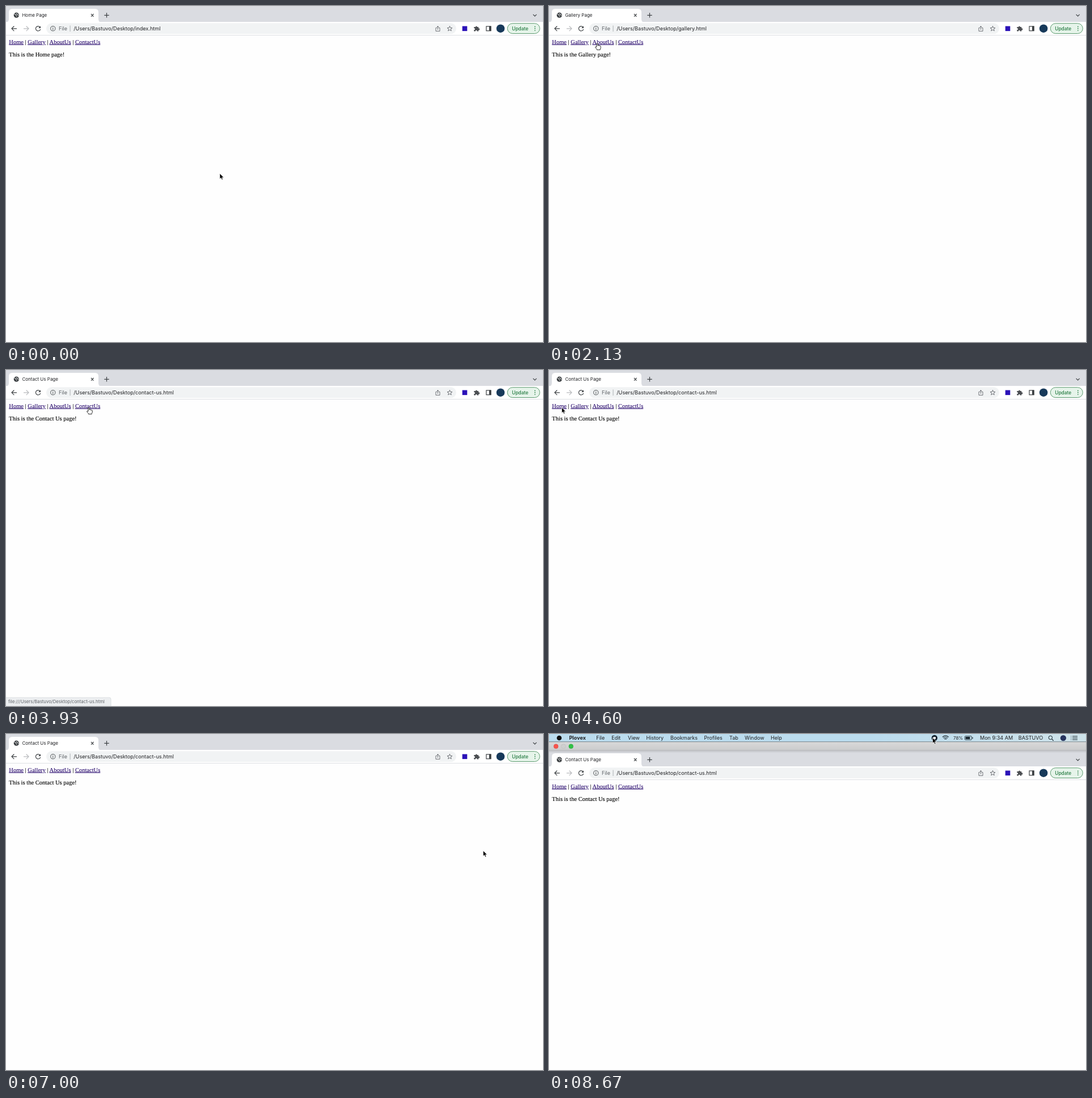
Recreate the animation shown at these times as an HTML page. Size 947x592 px, loop 8740 ms.

```html
<!DOCTYPE html>
<html lang="en">
<head>
<meta charset="utf-8">
<title>Page navigation</title>
<style>
html, body { margin: 0; width: 100%; height: 100%; overflow: hidden; background: #fefefe; }
svg { display: block; width: 100vw; height: 100vh; }
text { font-family: Inter, Roboto, sans-serif; font-size: 9.05px; fill: #202124; white-space: pre; }
.small { font-size: 8px; }
.page { font-family: "Liberation Serif", "Times New Roman", serif; font-size: 10.5px; fill: #000; stroke: #000; stroke-width: .12; }
.link { fill: #2c0f70; stroke: #2c0f70; text-decoration: underline; }
.line { fill: none; stroke: #3c4043; stroke-width: 1.2; }
</style>
</head>
<body>
<svg viewBox="0 0 947 592">
  <defs>
    <linearGradient id="bar" x2="0" y2="1">
      <stop offset="0" stop-color="#dadada"/><stop offset="1" stop-color="#c9cacb"/>
    </linearGradient>
    <linearGradient id="shade" x2="0" y2="1">
      <stop offset="0" stop-color="#000" stop-opacity=".14"/><stop offset="1" stop-color="#000" stop-opacity="0"/>
    </linearGradient>
    <linearGradient id="sky">
      <stop offset=".6" stop-color="#bbdcee"/><stop offset="1" stop-color="#cfe3ea"/>
    </linearGradient>
  </defs>
  <rect width="947" height="592" fill="#fefefe"/>

  <g id="window">
    <rect y="-16" width="947" height="17" fill="url(#bar)"/>
    <g stroke-width=".5">
      <circle cx="12.3" cy="-7.3" r="3.9" fill="#f7544d" stroke="#d8433d"/>
      <circle cx="25.6" cy="-7.3" r="3.9" fill="#cfcfcf" stroke="#b9b9b9"/>
      <circle cx="38.8" cy="-7.3" r="3.9" fill="#32c146" stroke="#27a238"/>
    </g>

    <!-- tab strip -->
    <rect width="947" height="28.5" fill="#dadce1"/>
    <rect id="shadow" y="-.5" width="947" height="5" fill="url(#shade)"/>
    <path d="M0 28.5Q5 28.5 5 23V11Q5 5 11 5H157Q163 5 163 11V23Q163 28.5 168 28.5Z" fill="#fff"/>
    <rect y="28" width="947" height="23.5" fill="#fff"/>
    <path d="M0 51.5H947" stroke="#dadce0" stroke-width=".9"/>
    <circle cx="18.3" cy="16.2" r="4.6" fill="#3c4043"/>
    <path d="M15 14.4Q17 14.2 17.6 16T19.2 18.8M18.8 12.8Q18.2 14.6 20 15.1T22 17" fill="none" stroke="#fff"/>
    <text id="title" class="small" x="28.4" y="19.1"></text>
    <path class="line" d="M150 14l4.6 4.6M154.6 14l-4.6 4.6M173.3 16.3h8.4M177.5 12.1v8.4M929.6 14.8l3 3 3-3"/>

    <!-- toolbar -->
    <rect x="71" y="30.2" width="723" height="19" rx="9.5" fill="#f1f3f4"/>
    <path class="line" d="M19 39.8H10.4M14.3 35.5L10 39.8L14.3 44.1"/>
    <path class="line" d="M31 39.8H39.6M35.7 35.5L40 39.8L35.7 44.1" style="stroke:#b9bbbe"/>
    <path class="line" d="M59.8 37A4.2 4.2 0 1 0 60.7 40.8"/>
    <path d="M61 35.2V39H57.2Z" fill="#3c4043"/>
    <circle cx="82.8" cy="39.7" r="4.1" class="line" style="stroke-width:.9"/>
    <path d="M82.8 39.1V42M82.8 37.3V38.3" class="line" style="stroke-width:1"/>
    <text x="93" y="43" style="fill:#5f6368">File</text>
    <path d="M113.1 34.5V45" stroke="#9aa0a6" stroke-width=".8"/>
    <text id="url" x="119.3" y="43" style="font-size:9.15px"></text>
    <g class="line" style="stroke-width:.9;stroke:#5f6368">
      <path d="M759.8 38.5H758V44.3H765V38.5H763.2M761.5 41.8V35.6M759.6 37.4L761.5 35.5L763.4 37.4"/>
      <path id="star"/>
    </g>
    <rect x="804.7" y="35.5" width="8.6" height="8.6" fill="#2b12b8"/>
    <path d="M825.3 37H828A1.5 1.5 0 1 1 831 37H833.3V39.5A1.5 1.5 0 1 1 833.3 42.3V44.6H830.7A1.4 1.4 0 1 0 828 44.6H825.3V42A1.4 1.4 0 1 0 825.3 39.3Z" fill="#4b4e52"/>
    <rect x="847" y="35.9" width="8" height="7.8" class="line"/>
    <path d="M852 35.5H855.5V44H852Z" fill="#3c4043"/>
    <circle cx="872.1" cy="39.7" r="7.3" fill="#17395a"/>
    <rect x="884.3" y="30.7" width="57" height="17.8" rx="8.9" fill="#e6f4ea" stroke="#5b9a6e"/>
    <text x="892.3" y="42.9" style="font-size:8.3px;font-weight:500;fill:#247a41">Update</text>
    <path d="M932.8 36.4v.01M932.8 39.7v.01M932.8 43v.01" stroke="#247a41" stroke-width="1.7" stroke-linecap="round"/>

    <!-- page -->
    <text id="nav" class="page" x="5.3" y="66.5"></text>
    <text id="body" class="page" x="5.3" y="89"></text>
  </g>

  <g id="status">
    <path id="bubble" fill="#eceef0" stroke="#d5d7da" stroke-width=".7"/>
    <text id="hint" x="4" y="586.5" style="font-size:7.8px;fill:#5f6368"></text>
  </g>

  <g id="menu">
    <rect width="947" height="13.7" fill="url(#sky)"/>
    <path d="M0 13.7H947" stroke="#5f6a71" stroke-width=".8"/>
    <circle cx="18" cy="7" r="4.3" fill="#111"/>
    <g id="items"></g>
    <circle cx="679.8" cy="7" r="5.2" fill="#10202c"/>
    <rect x="677.6" y="5" width="4.4" height="4" rx="1" fill="#fff"/>
    <g class="line" style="stroke:#15222b">
      <path d="M693.8 5.4Q699.3 .8 704.8 5.4M695.6 7.3Q699.3 4.2 703 7.3M697.4 9.1Q699.3 7.7 701.2 9.1"/>
      <rect x="733.3" y="3.6" width="12" height="6.8" rx="1.3" style="stroke-width:.8"/>
      <path d="M747 5.7V8.3M920.3 4H921.3M920.3 7H921.3M920.3 10H921.3M923 4H932M923 7H932M923 10H932"/>
      <circle cx="884.3" cy="6.4" r="3.2" style="stroke-width:1"/>
      <path d="M886.7 8.8L889.7 11.8"/>
    </g>
    <rect x="734.6" y="4.9" width="7.8" height="4.2" fill="#15222b"/>
    <circle cx="906.9" cy="7.1" r="5.2" fill="#26345f"/>
  </g>

  <g id="cursor" stroke-linejoin="round">
    <path id="arrow" d="M0 0V9.8L2.2 7.8L3.7 11.2L5.4 10.4L4 7.2H7Z" fill="#000" stroke="#fff" stroke-width=".7"/>
    <path id="hand" d="M-1 .8Q0-.7 1 .8V4Q2.2 3.1 3 4.3Q4.1 3.6 4.8 4.8Q6.2 4.4 6.2 5.9V8Q6 9.6 5.2 10.6V11.7H-.6V10.7Q-2.5 8.8-3.5 6.8Q-3.2 5.3-1 6.9Z" fill="#fff" stroke="#111" stroke-width=".9"/>
  </g>
</svg>

<script>
const LOOP = 8740;
const USER = "Bastuvo";
const $ = id => document.getElementById(id);

const pages = {
  home: ["Home", "index"],
  gallery: ["Gallery", "gallery"],
  about: ["About Us", "about-us"],
  contact: ["Contact Us", "contact-us"]
};
const visits = [[0, "home"], [1200, "gallery"], [2600, "about"],
  [3870, "contact"], [4870, "home"], [6000, "contact"]];

// start and end of each hover, its status bubble and the link under the pointer
const hovers = [
  [900, 1750, 1000, 1400, "gallery"],
  [2060, 2930, 2470, 2930, "about"],
  [3330, 4050, 3670, 4070, "contact"],
  [4670, 5040, 4700, 5080, "home"],
  [5840, 6190, 5870, 6230, "contact"]
];

// time, x, y of the pointer tip
const track = [
  [70, 377, 295], [930, 52, 66], [1730, 52, 66], [2130, 85, 65.5], [2330, 92, 66],
  [2870, 92, 66], [3270, 142, 72.5], [3470, 146, 66], [4000, 146, 66], [4530, 22.5, 66],
  [5000, 22.5, 66], [5470, 150, 72], [5800, 155.5, 69], [5900, 156, 65], [6150, 156, 65],
  [6400, 163, 101], [6470, 163, 101], [6530, 170, 105], [6730, 170, 105],
  [6870, 618, 203], [7000, 841.5, 205.5], [7600, 700, 1], [7700, 700, 1],
  [8530, 678, 5], [8600, 678, 5], [8670, 676.5, 6.5]
];

const ease = p => {
  p = Math.max(0, Math.min(1, p));
  return p * p * (3 - 2 * p);
};
const path = page => `/Users/${USER}/Desktop/${pages[page][1]}.html`;

function pointer(t) {
  const i = track.findIndex(k => k[0] > t);
  if (i === 0) return track[0].slice(1);
  if (i < 0) return track[track.length - 1].slice(1);
  const [a, x, y] = track[i - 1], [b, u, v] = track[i];
  const p = ease((t - a) / (b - a));
  return [x + (u - x) * p, y + (v - y) * p];
}

function setup() {
  $("nav").innerHTML = ["Home", "Gallery", "AboutUs", "ContactUs"]
    .map(s => `<tspan class="link">${s}</tspan>`).join(" | ");

  const items = [["File", 83.3], ["Edit", 110.2], ["View", 139], ["History", 171.5],
    ["Bookmarks", 214], ["Profiles", 273.5], ["Tab", 318], ["Window", 345],
    ["Help", 391], ["Mon 9:34 AM", 760], [USER.toUpperCase(), 827.8]];
  $("items").innerHTML =
    '<text x="35.5" y="10.4" style="font-weight:700">Plovex</text>' +
    '<text class="small" x="713" y="10">78%</text>' +
    items.map(([s, x]) => `<text x="${x}" y="10.4">${s}</text>`).join("");

  const points = Array.from({ length: 10 }, (_, i) => {
    const r = i % 2 ? 2 : 4.7, a = i * Math.PI / 5;
    return `${782.5 + r * Math.sin(a)} ${40 - r * Math.cos(a)}`;
  });
  $("star").setAttribute("d", `M${points.join("L")}Z`);
}

let shown;
function showPage(page) {
  if (page === shown) return;
  shown = page;
  const name = pages[page][0];
  $("title").textContent = `${name} Page`;
  $("url").textContent = path(page);
  $("body").textContent = `This is the ${name} page!`;
}

function draw(t) {
  showPage(visits.filter(v => v[0] <= t).pop()[1]);

  const drop = ease((t - 7800) / 420);
  $("window").setAttribute("transform", `translate(0 ${29 * drop})`);
  $("menu").setAttribute("transform", `translate(0 ${14.5 * (drop - 1)})`);
  $("shadow").setAttribute("opacity", drop);

  const hint = hovers.find(h => t >= h[2] && t < h[3]);
  $("status").setAttribute("opacity", hint ? Math.min(1, (t - hint[2]) / 100, (hint[3] - t) / 130) : 0);
  if (hint) {
    const w = hint[4] === "contact" ? 185 : 166;
    $("hint").textContent = "file://" + path(hint[4]);
    $("bubble").setAttribute("d", `M-1 577H${w - 3}Q${w} 577 ${w} 580V593H-1Z`);
  }

  const over = hovers.some(h => t >= h[0] && t < h[1]);
  $("hand").setAttribute("visibility", over ? "visible" : "hidden");
  $("arrow").setAttribute("visibility", over ? "hidden" : "visible");
  $("cursor").setAttribute("transform", `translate(${pointer(t)})`);
}

setup();
const start = performance.now();
function tick() {
  draw((performance.now() - start) % LOOP);
  requestAnimationFrame(tick);
}
tick();
</script>
</body>
</html>
```
